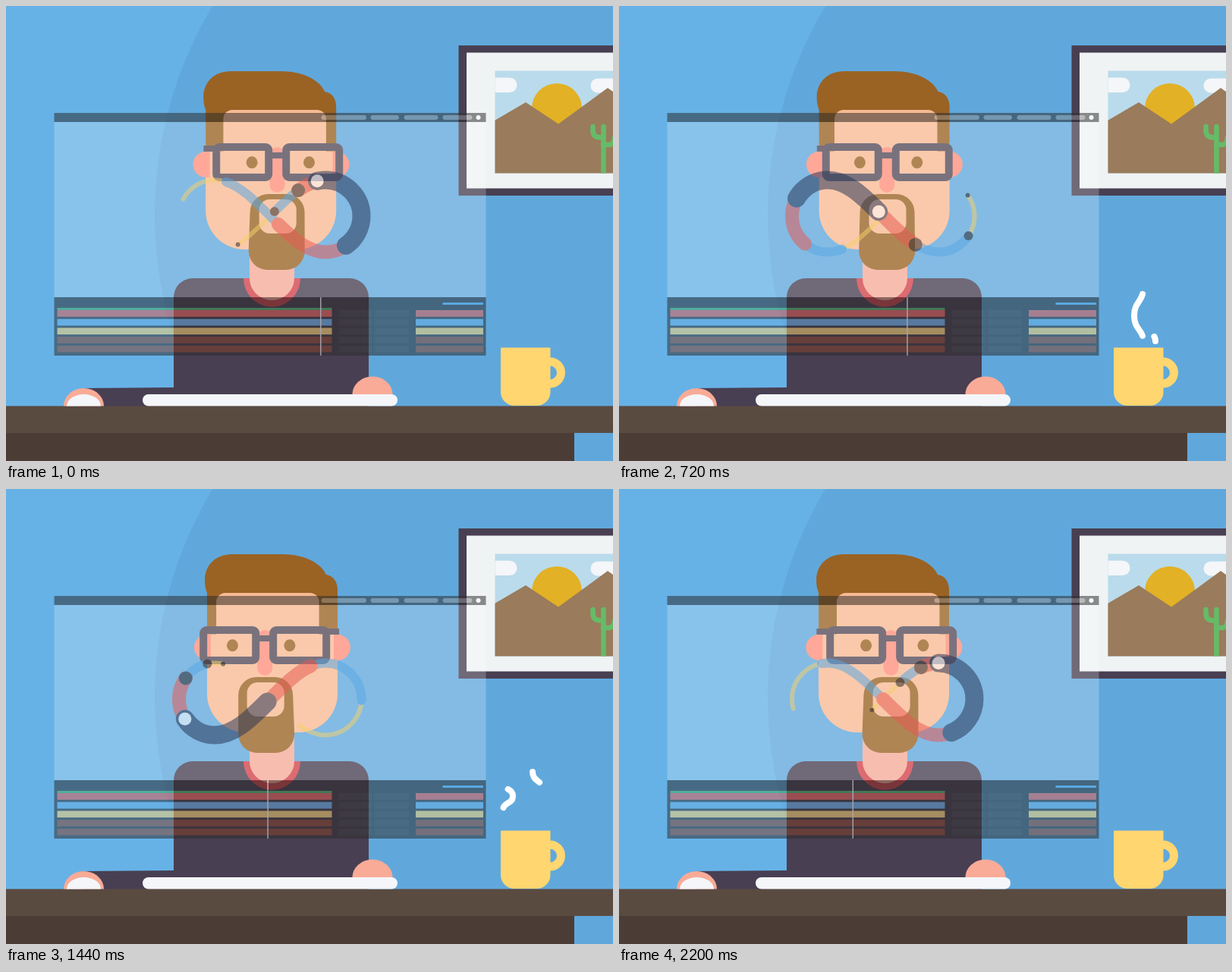
An HTML page for the animation above (2.24 s loop, 800 by 600 pixels).

```html
<!DOCTYPE html>
<html lang="en">
<head>
<meta charset="utf-8">
<title>Desk animator</title>
<style>
  html, body { margin: 0; width: 100%; height: 100%; overflow: hidden; background: #66b2e7; }
  svg { display: block; width: 800px; height: 600px; }
  .dark { fill: #483f52; }
  .hair { fill: #9a6324; }
  .skin { fill: #f8ba93; }
  .pink { fill: #ff8f7c; }
  .hand { fill: #f9ab97; }
  .white { fill: #f4f6f9; }
  .mug { fill: #ffd670; }
  .frames { fill: none; stroke: #534a58; stroke-width: 10; }
  .arm { fill: #534a58; }
  .panel { fill: #2c2c2d; }
  .trail { fill: none; stroke-linecap: round; }
  .steam { fill: none; stroke: #fff; stroke-width: 8; stroke-linecap: round; }
  .cactus { fill: none; stroke: #66bb68; stroke-width: 6.6; stroke-linecap: round; }
</style>
</head>
<body>
<svg viewBox="0 0 800 600">
  <defs><clipPath id="art"><path d="M644.5 85.5H800V220.5H644.5z"/></clipPath></defs>
  <path fill="#66b2e7" d="M0 0H800V600H0z"/>
  <circle cx="731.5" cy="275" r="535.5" fill="#60a8dc"/>

  <!-- picture on the wall -->
  <path class="dark" d="M596.5 52H800V250H596.5z"/>
  <path fill="#eff3f4" d="M607 61.5H800V240.5H607z"/>
  <g clip-path="url(#art)">
    <path fill="#badbeb" d="M644 85H800V221H644z"/>
    <rect class="white" x="630" y="94.5" width="43.5" height="19.5" rx="9.75"/>
    <rect class="white" x="770.5" y="95.5" width="50" height="19" rx="9.5"/>
    <circle cx="726" cy="135" r="33" fill="#e2b125"/>
    <path fill="#9a7b5b" d="M644 151 685 127 728 155.500 793 108 800 113V221H644z"/>
    <path class="cactus" d="M787.5 159V226M773.500 159V164Q773.500 173.500 784 173.500M787 183H795Q802 182 802 174"/>
  </g>

  <!-- body -->
  <path class="dark" d="M100 504 221 503V384a25 25 0 0 1 25-25H453a25 25 0 0 1 25 25V528H100z"/>
  <path fill="#d2414a" d="M313 359H388a37.500 38 0 0 1-75 0z"/>
  <path fill="#f5ac99" d="M321 300H380V359a29.500 29 0 0 1-59 0z"/>

  <!-- head -->
  <g id="head">
    <path class="skin" d="M265 180V270a51 51 0 0 0 51 51H386a51 51 0 0 0 51-51V180z"/>
    <path class="hair" d="M265 191.500V137Q262 130 262 120C262 100 277 86 298 86H364C392 86 415 97 422 113C431 114 437 122 437 133V191.500z"/>
  </g>
  <path id="brow" class="skin" d="M277 193V149a12 12 0 0 1 12-12H400.500a12 12 0 0 1 12 12V193z"/>
  <g id="ears" class="pink">
    <path d="M270 192H265a17 17 0 0 0 0 34h5z"/>
    <path d="M432 192H437a17 17 0 0 1 0 34h-5z"/>
  </g>
  <rect id="nose" class="pink" x="331" y="186" width="20" height="60" rx="10"/>
  <path id="beard" class="hair"/>
  <rect id="mouth" class="skin" x="317.5" y="255" width="49" height="45" rx="14"/>
  <g id="eyes" class="hair">
    <ellipse cx="298.2" cy="206.300" rx="7.500" ry="8"/>
    <ellipse cx="373.600" cy="206.300" rx="7.500" ry="8"/>
  </g>
  <rect id="armL" class="arm" y="184" height="8"/>
  <rect id="armR" class="arm" y="184" height="8"/>
  <g id="glasses">
    <rect class="frames" x="260" y="186" width="69" height="40" rx="4"/>
    <rect class="frames" x="352" y="186" width="70" height="40" rx="4"/>
    <path class="arm" d="M333 193H348V201H333z"/>
  </g>

  <!-- desk -->
  <path fill="#5a4b41" d="M0 527.500H800V563H0z"/>
  <path fill="#4b3d36" d="M0 563H749V600H0z"/>
  <path class="hand" d="M76 527.500a26.500 23.500 0 0 1 53 0z"/>
  <path class="white" d="M80 527.500a22.500 15.500 0 0 1 45 0z"/>
  <path class="hand" d="M456.500 512a26.500 23.500 0 0 1 53 0z"/>
  <rect class="white" x="180" y="512" width="336" height="15.500" rx="7.750"/>
  <circle cx="717" cy="483.500" r="14.500" fill="none" stroke="#ffd670" stroke-width="11"/>
  <path class="mug" d="M652 450.500H717.500V509a18 18 0 0 1-18 18H670a18 18 0 0 1-18-18z"/>
  <g id="vapour"></g>

  <!-- see-through screen -->
  <path fill="#fff" fill-opacity=".22" d="M63.500 153H632.500V384H63.500z"/>
  <g opacity=".53">
    <path class="panel" d="M63.500 141H632.500V153H63.500zM63.500 384H632.500V461H63.500z"/>
    <g id="menu" fill="#888"></g>
    <circle cx="622.5" cy="147" r="3" fill="#fff"/>
    <g id="rows"></g>
    <path fill="#40a85a" d="M67.500 398H429.500V401H67.500z"/>
    <path fill="#58a8e4" d="M575.500 391H629V394H575.500z"/>
    <path id="playhead" fill="#fff" d="M-.7 384H.7V461H-.7z"/>
    <g id="loop"></g>
  </g>
</svg>
<script>
const FRAME = 40, FRAMES = 56;
const HALF = 327, FULL = 2 * HALF;
const EIGHT = 'M348 277C374 303 395 324.5 421 324.5S468.5 303 468.5 277 447 229.5 421 229.5' +
  ' 374 251 348 277 301 324.5 275 324.5 228 303 228 277 249 229.5 275 229.5 322 251 348 277z';
// distance along the eight for each frame of half a lap
const LAP = [-50, -31, -8, 21, 57, 97, 136, 168, 193, 213, 228, 238, 249, 262];
const LAP_START = 16, LEAD = 2, TRAIL = 131;

const $ = id => document.getElementById(id);
const mod = (a, n) => ((a % n) + n) % n;
const clamp = v => Math.min(1, Math.max(0, v));

function add(parent, tag, attrs) {
  const el = document.createElementNS('http://www.w3.org/2000/svg', tag);
  for (const k in attrs) el.setAttribute(k, attrs[k]);
  return $(parent).appendChild(el);
}

for (const [x, w] of [[415.5, 59.5], [480.5, 37.5], [524.5, 45], [575.5, 39]])
  add('menu', 'rect', { x, y: 144, width: w, height: 6, rx: 3 });

['#e25b50', '#66aee4', '#fad26d', '#843f26', '#843f26'].forEach((fill, i) => {
  const bar = (x, end, fill) =>
    add('rows', 'rect', { x, y: 401 + 11.7 * i, width: end - x, height: 8.8, fill });
  bar(67.5, 429.5, fill);
  bar(438.5, 482, '#363638');
  bar(486, 531, '#363638');
  bar(540, 629, fill);
});

// trails, the thin ones lie underneath
const colours = ['#283556', '#e85a54', '#58a8e4', '#f5d06c'];
const trails = [3, 2, 1, 0].map(k => ({
  k,
  el: add('loop', 'path', {
    d: EIGHT, class: 'trail', pathLength: FULL, stroke: colours[k], 'stroke-width': 24 - 6 * k
  })
}));
const dots = [3, 2, 1, 0].map(k => ({
  k,
  el: add('loop', 'circle', { r: k ? 12 - 3 * k : 8.5, fill: k ? '#2c2627' : '#fff' })
}));
const eight = trails[0].el, eightLength = eight.getTotalLength();

// each puff: path, then begin and end of its head and of its tail in ms
const puffs = [
  ['M691 443C691 425 679 428 679 408C679 390 691 390 691 372C691 355 679 358 679 338', 327, 1015, 598, 1348],
  ['M707 442C707 430 694 432 694 418C694 405 707 408 707 395C707 384 694 386 694 373', 586, 1376, 815, 1700],
  ['M668 444C668 432 655 436 655 424C655 412 668 416 668 405C668 394 655 398 655 385', 753, 1694, 924, 2136]
].map(([d, ...times]) => ({ times, el: add('vapour', 'path', { d, class: 'steam', pathLength: 1 }) }));

function lapAt(n) {
  const q = Math.floor((n - LAP_START) / LAP.length);
  return LAP[n - LAP_START - q * LAP.length] + q * HALF;
}

function smooth(t, from, to) {
  const x = clamp((t - from) / (to - from));
  return x * x * (3 - 2 * x);
}

// 0 = looking left, 1 = looking right
function turn(t) {
  const p = mod(t - 400, 1120) / 560, x = p < 1 ? p : 2 - p;
  const a = x ** 2.6, b = (1 - x) ** 2.6;
  return a / (a + b);
}

function shift(id, x) {
  $(id).setAttribute('transform', `translate(${x} 0)`);
}

function span(id, from, to) {
  $(id).setAttribute('x', from);
  $(id).setAttribute('width', Math.max(0, to - from));
}

function drawHead(u) {
  const moves = { head: -2, ears: -1.7, brow: 10.3, nose: 18, mouth: 17.7, eyes: 28.3, glasses: 18.8 };
  for (const id in moves) shift(id, moves[id] * u);
  span('armL', 262 - 1.7 * u, 257 + 18.8 * u);
  span('armR', 424 + 18.8 * u, 439 - 1.7 * u);
  const top = 306 + 17 * u, chin = 306 + 15 * u;
  $('beard').setAttribute('d', `M${chin} 323L${top} 272a24 24 0 0 1 24-24h24a24 24 0 0 1 24 24` +
    `L${chin + 74} 323a25 25 0 0 1-25 25h-24a25 25 0 0 1-25-25z`);
}

function drawLoop(n) {
  for (const { k, el } of trails) {
    const len = TRAIL * (k + 1);
    el.setAttribute('stroke-dasharray', `${len} ${FULL - len}`);
    el.setAttribute('stroke-dashoffset', -mod(lapAt(n + LEAD * k) - len, FULL));
  }
  for (const { k, el } of dots) {
    const p = eight.getPointAtLength(mod(lapAt(n + LEAD * k), FULL) / FULL * eightLength);
    el.setAttribute('cx', p.x);
    el.setAttribute('cy', p.y);
  }
}

function drawSteam(t) {
  for (const { times: [h0, h1, t0, t1], el } of puffs) {
    const head = smooth(t, h0, h1), tail = smooth(t, t0, t1);
    el.setAttribute('visibility', head > 0 && tail < 1 ? 'visible' : 'hidden');
    el.setAttribute('stroke-dasharray', `${Math.max(.001, head - tail)} 3`);
    el.setAttribute('stroke-dashoffset', -tail);
  }
}

function draw(n) {
  const t = n * FRAME;
  drawHead(turn(t));
  drawLoop(n);
  drawSteam(t);
  shift('playhead', 414.8 - .0484 * t);
}

const begin = performance.now();
function tick() {
  draw(Math.floor((performance.now() - begin) / FRAME) % FRAMES);
  requestAnimationFrame(tick);
}
tick();
</script>
</body>
</html>
```
